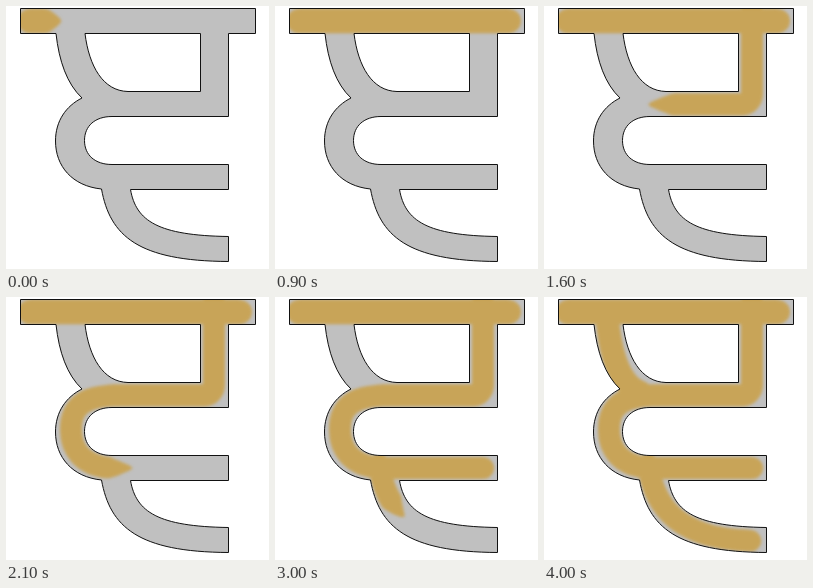
These frames come from a looping animation (263x263 px, 4100 ms). An HTML page with a canvas:

```html
<!DOCTYPE html>
<html lang="en">
<head>
<meta charset="utf-8">
<title>Letter stroke order</title>
<style>
  html, body { margin: 0; height: 100%; overflow: hidden; background: #fff; }
  canvas { display: block; }
</style>
</head>
<body>
<canvas width="263" height="263"></canvas>
<script>
const ctx = document.querySelector('canvas').getContext('2d');
const LOOP = 4100, STEP = 100;

const letter = new Path2D(`
  M14.5 2.5 H249.5 V27.5 H222.5 V110.5 H106
  C89 110.5 78.5 120 78.5 134.5 C78.5 149 89 158.5 106 158.5
  H222.5 V183.5 H124.5 C130 215 152 229.5 222.5 230.5 V255.5
  C132 255 104 230 95.5 183 C66 180 49.5 160 49.5 135
  C49.5 115 60 100 76 92 C61 78 53 55 50 27.5 H14.5 Z
  M79 27.5 H194.5 V85.5 H122 C97 85 83 60 79 27.5 Z`);

// first: step of the first visible piece; start: its length; speed: px per step
const strokes = [
  { d: 'M24 15 H245', first: 0, start: 31, speed: 32.6, radius: 12.2, taper: 17 },
  { d: 'M208 5 V87 Q208 98.5 196 98.5 H112 C79 98.5 65 109 65 132 C65 157 82 171 110 171 H219',
    first: 10, start: 22, speed: 28.5, radius: 11, taper: 26 },
  { d: 'M104 168 C111 212 136 244 217 244', first: 29, start: 30, speed: 29, radius: 11, taper: 22 },
  { d: 'M63 18 C66 55 75 97 108 98', first: 37, start: 34, speed: 30, radius: 11.8, taper: 22 }
].map(stroke => {
  const path = document.createElementNS('http://www.w3.org/2000/svg', 'path');
  path.setAttribute('d', stroke.d);
  const points = [];
  for (let s = 0; s <= path.getTotalLength(); s++) points.push(path.getPointAtLength(s));
  return { ...stroke, points };
});

function addBrush(shape, { points, first, start, speed, radius, taper }, step) {
  if (step < first) return;
  const end = points.length - 1;
  const tip = start + speed * (step - first);
  const done = tip >= end;
  const length = Math.min(tip, end);
  for (let s = 0; s < length; s++) {
    const k = Math.min(1, (length - s) / (done ? 12 : taper));
    const r = radius * (done ? Math.sqrt(k * (2 - k)) : k ** 0.8);
    const { x, y } = points[s];
    // keep the round brush from passing the tip
    const size = Math.min(r, length - s + 1);
    shape.moveTo(x + size, y);
    shape.arc(x, y, size, 0, 2 * Math.PI);
  }
}

function draw(now) {
  const step = Math.floor(now % LOOP / STEP);
  ctx.fillStyle = '#fff';
  ctx.fillRect(0, 0, 263, 263);
  ctx.fillStyle = '#c0c0c0';
  ctx.fill(letter, 'evenodd');

  const gold = new Path2D();
  for (const stroke of strokes) addBrush(gold, stroke, step);
  ctx.save();
  ctx.clip(letter, 'evenodd');
  ctx.filter = 'blur(1.7px)';
  ctx.fillStyle = '#c8a458';
  ctx.fill(gold);
  ctx.restore();

  ctx.strokeStyle = '#111';
  ctx.lineWidth = 1;
  ctx.stroke(letter);
}

const began = performance.now();
function tick() {
  draw(performance.now() - began);
  requestAnimationFrame(tick);
}
tick();
</script>
</body>
</html>
```
